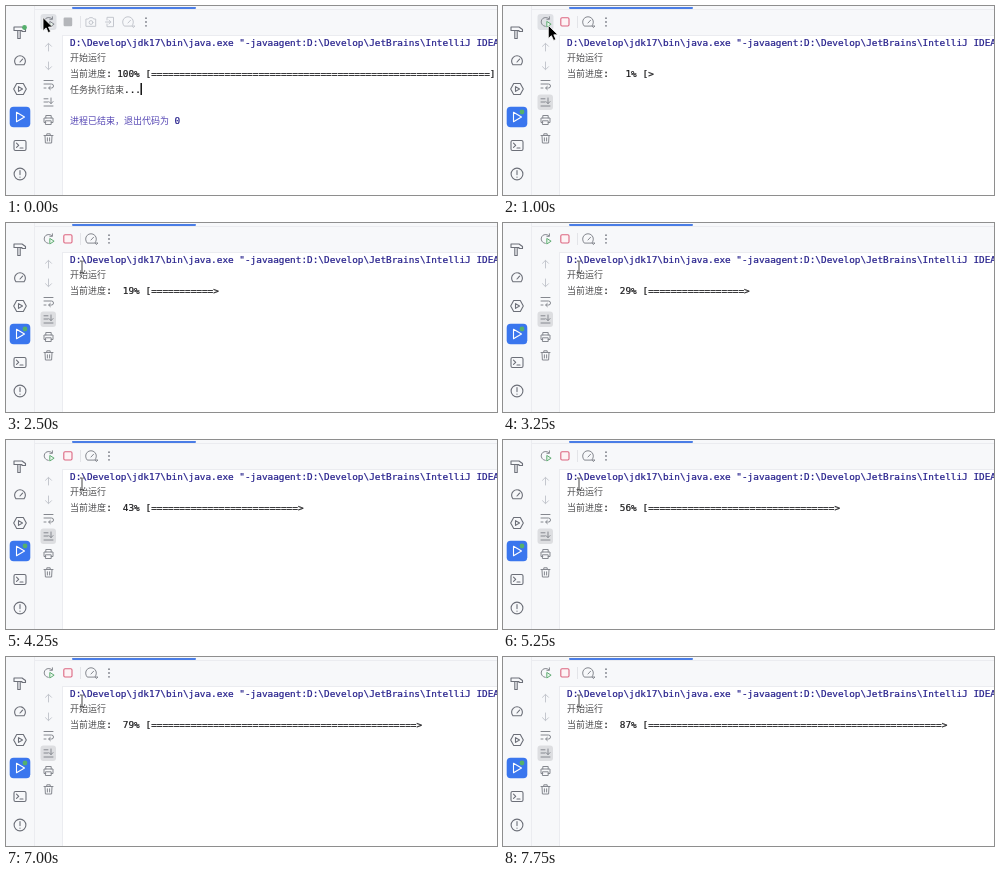
These frames come from a looping animation (491x189 px, 8000 ms). An HTML page:

```html
<!DOCTYPE html>
<html lang="zh">
<head>
<meta charset="utf-8">
<title>Run console</title>
<style>
html, body { margin: 0; width: 100%; height: 100%; overflow: hidden; background: #fff; }
svg { display: block; }
text { font: 9.4px "DejaVu Sans Mono", "Noto Sans Mono", monospace; fill: #1c1c1e; stroke: #1c1c1e; stroke-width: .22; white-space: pre; }
text.navy { fill: #26208c; stroke: #26208c; }
text.cjk { font: 9px "Noto Sans CJK SC", "Noto Sans CJK", sans-serif; fill: #505052; stroke: none; }
text.cjk.navy { fill: #5546b4; }
.icon { fill: none; stroke: #85888f; stroke-width: 1; stroke-linecap: round; stroke-linejoin: round; }
.side { stroke: #6c6f78; stroke-width: 1.1; }
.pale { stroke: #c4c7ce; }
.dot { fill: #55b06c; stroke: none; }
.solid { fill: #7c7f88; stroke: none; }
</style>
</head>
<body>
<svg width="491" height="189" viewBox="0 0 491 189">
  <defs>
    <g id="gauge">
      <path d="M-4 3.8A5.4 5.4 0 1 1 4 3.8Z"/>
      <path d="M0 1L2.6-1.8"/>
    </g>
    <g id="more" class="solid">
      <circle cy="-3.8" r=".9"/><circle r=".9"/><circle cy="3.8" r=".9"/>
    </g>
  </defs>

  <rect width="491" height="189" fill="#fff"/>
  <rect width="56" height="189" fill="#f7f8fa"/>
  <rect x="28" width="463" height="29" fill="#f7f8fa"/>
  <path d="M28.5 0V189M56.5 29V189M29 3.5H491M56 29.5H491" stroke="#ebecf0"/>
  <rect x="66" y="1" width="124" height="1.9" rx=".8" fill="#4a7de6"/>

  <!-- tool window stripe -->
  <g class="icon side">
    <path d="M8 21H16L19.5 23.5V25.5H16V24.5H8ZM11.8 24.5H14.2V32.5H11.8Z"/>
    <use href="#gauge" x="14" y="55"/>
    <path d="M10.7 77.5H17.3L20.3 83L17.3 88.5H10.7L7.7 83ZM12.5 80.6V85.4L16.5 83Z"/>
    <rect x="3.7" y="100.7" width="20.6" height="20.6" rx="4" fill="#3a76ee" stroke="none"/>
    <path d="M10.5 106.3V115.7L18.5 111Z" stroke="#fff"/>
    <rect x="8" y="134.5" width="12" height="10" rx="1.5"/>
    <path d="M10.5 137.2L12.7 139.3L10.5 141.4M14 142H17"/>
    <circle cx="14" cy="168" r="5.9"/>
    <path d="M14 164.6V168.6M14 171V171.2"/>
  </g>

  <!-- console gutter -->
  <rect id="scroll" x="34.5" y="88.5" width="15.5" height="15.5" rx="3" fill="#dddee1"/>
  <g class="icon">
    <path class="pale" d="M42.5 45V37.5M39.5 40.3L42.5 37.3L45.5 40.3M42.5 56V63.5M39.5 60.7L42.5 63.7L45.5 60.7"/>
    <path d="M38 74.5H47M38 78H45.5A2 2 0 0 1 45.5 82H43M44.3 80.4L42.6 82L44.3 83.6M38 82H40"/>
    <path d="M38 92.8H42M38 96H42M38 100H47M45 92V97.5M43 95.6L45 97.6L47 95.6"/>
    <path d="M39.8 112V109.5H45.2V112M39.8 116.5H38V112H47V116.5H45.2M39.8 114.8H45.2V118.5H39.8Z"/>
    <path d="M38 129.5H47M40.8 129.3V127.8H44.2V129.3M39 129.8L39.4 137H45.6L46 129.8M41.4 131.8V135M43.6 131.8V135"/>
  </g>

  <!-- toolbar -->
  <rect id="hover" x="34.5" y="8" width="16" height="16" rx="3" fill="#dfe1e5"/>
  <g class="icon">
    <path d="M46 12.9A4.5 4.5 0 1 0 42.3 20.4M46.4 10.8V13.3H43.9"/>
    <path id="play" d="M43.8 15.8V21L47.8 18.4Z" fill="#e9f5ec" stroke="#62ad74"/>
  </g>
  <path d="M74.5 10V22" stroke="#e3e4e8"/>
  <text class="navy" x="64" y="39.8">D:\Develop\jdk17\bin\java.exe "-javaagent:D:\Develop\JetBrains\IntelliJ IDEA</text>

  <g id="idle">
    <circle class="dot" cx="18.5" cy="21.5" r="2.4"/>
    <rect x="57.6" y="11.6" width="8.6" height="8.6" rx="1.2" fill="#b4b6ba"/>
    <g class="icon pale">
      <path d="M80.3 13H82.4L83.4 11.7H86.6L87.6 13H89.7V20.3H80.3Z"/>
      <circle cx="85" cy="16.5" r="1.9"/>
      <path d="M101 14V11.3H107.5V20.7H101V18M99.5 16H104.8M103 14.2L104.9 16L103 17.8"/>
      <use href="#gauge" x="122" y="16"/>
      <path d="M126.3 20H129L127.7 21.3Z"/>
    </g>
    <use href="#more" x="140" y="16"/>
    <text class="cjk" x="64" y="86.6">任务执行结束</text>
    <text x="118" y="86.6">...</text>
    <rect x="134.5" y="77" width="1.4" height="12"/>
    <text class="cjk navy" x="64" y="117.6">进程已结束，退出代码为</text>
    <text class="navy" x="168.6" y="117.8">0</text>
  </g>

  <g id="running">
    <circle class="dot" cx="19" cy="106" r="2.4"/>
    <rect x="57.8" y="11.8" width="8.2" height="8.2" rx="1.2" fill="#fdf3f5" stroke="#dc6680" stroke-width="1.1"/>
    <g class="icon">
      <use href="#gauge" x="85" y="16"/>
      <path d="M89.3 20H92L90.7 21.3Z"/>
    </g>
    <use href="#more" x="103" y="16"/>
  </g>

  <g id="output">
    <text class="cjk" x="64" y="55.2">开始运行</text>
    <text class="cjk" x="64" y="71">当前进度</text>
    <text x="100.3" y="70.8">:</text>
    <text id="percent" x="111.2" y="70.8"></text>
    <text id="bar" x="139.5" y="70.8"></text>
  </g>

  <path id="arrow" d="M0 0V13.2L3.1 10.4L5.3 15.2L7.6 14.1L5.5 9.5H9.6Z" fill="#000" stroke="#fff" stroke-width=".8"/>
  <path id="beam" d="M-2-6H-.6L0-5.4L.6-6H2M0-5.4V5.4M-2 6H-.6L0 5.4L.6 6H2" fill="none" stroke="#444"/>
</svg>

<script>
const LOOP = 8000, STEP = 250, START = 500, PRINT = 1000, WIDTH = 60;
const $ = id => document.getElementById(id);
const show = (id, on) => { $(id).style.display = on ? "" : "none"; };

// [time, value...] points
const progress = [[1000, 1], [2500, 19.2], [4250, 43.4], [5000, 51.6],
                  [5250, 56.2], [6250, 69.2], [7500, 86], [7750, 87.2]];
const pointer = [[250, 37, 11.5], [1000, 45.3, 19.3], [1250, 52, 25], [2000, 76, 44]];

function sample(points, t) {
  if (t <= points[0][0]) return points[0].slice(1);
  const i = points.findIndex(p => p[0] > t);
  if (i < 0) return points[points.length - 1].slice(1);
  const a = points[i - 1], b = points[i];
  const k = (t - a[0]) / (b[0] - a[0]);
  return a.slice(1).map((v, j) => v + (b[j + 1] - v) * k);
}

function draw(t) {
  const idle = t < START;
  show("idle", idle);
  show("running", !idle);
  show("scroll", !idle);
  show("output", idle || t >= PRINT);
  show("hover", t < 1250);
  $("play").setAttribute("stroke", idle ? "#85888f" : "#62ad74");

  const value = idle ? 100 : sample(progress, t)[0];
  const filled = "=".repeat(Math.floor(value * WIDTH / 100));
  $("percent").textContent = String(Math.floor(value)).padStart(3) + "%";
  $("bar").textContent = "[" + filled + (idle ? "]" : ">");

  const [x, y] = sample(pointer, t);
  const overText = x > 57 && y > 29;
  show("arrow", !overText);
  show("beam", overText);
  $(overText ? "beam" : "arrow").setAttribute("transform", `translate(${x} ${y})`);
}

let last = -1;
function tick() {
  const t = Math.floor(performance.now() % LOOP / STEP) * STEP;
  if (t !== last) draw(last = t);
  requestAnimationFrame(tick);
}
tick();
</script>
</body>
</html>
```
